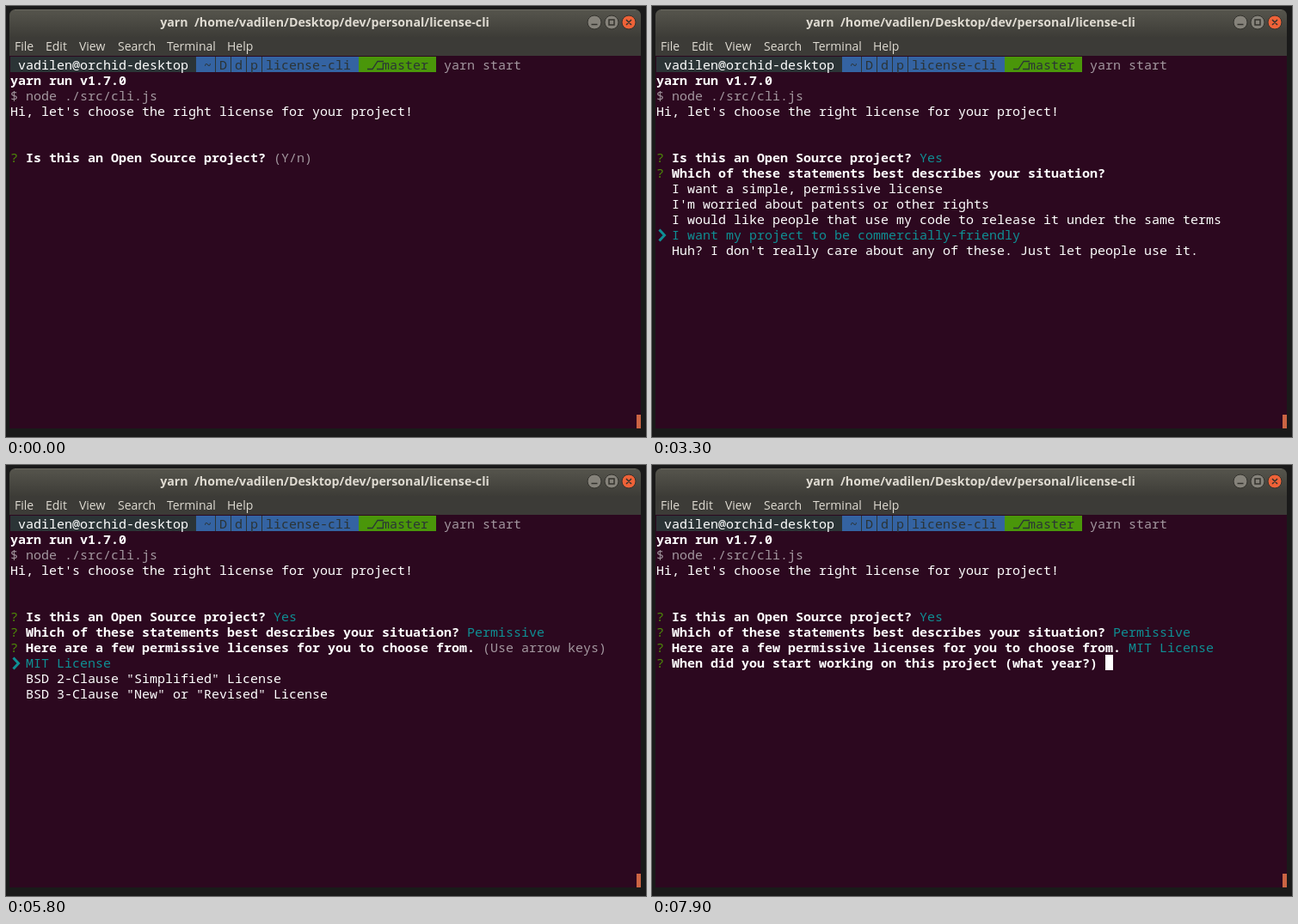
Write an HTML page that moves like this. It is 744 px wide and 502 px high and loops after 8000 ms.

```html
<!DOCTYPE html>
<html lang="en">
<head>
<meta charset="utf-8">
<title>Terminal</title>
<style>
  html, body { margin: 0; width: 100%; height: 100%; overflow: hidden; background: #1a1a1a; }
  svg { display: block; width: 744px; height: 502px; }
  text { white-space: pre; }
  .ui { font: 14px "Open Sans", "Noto Sans", sans-serif; fill: #dfdbd2; }
  .title { font-size: 14.2px; font-weight: 700; }
  .term { font: 15px "Noto Sans Mono", "DejaVu Sans Mono", monospace; }
  .w { fill: #fff; }
  .b { fill: #fff; font-weight: 700; }
  .g { fill: #a3979f; }
  .q { fill: #4e8a08; }
  .c { fill: #0f8f94; }
  .d { fill: #2b3436; }
</style>
</head>
<body>
<svg viewBox="0 0 744 502">
  <defs>
    <linearGradient id="bar" x2="0" y2="1">
      <stop offset="0" stop-color="#56554d"/>
      <stop offset="1" stop-color="#3d3c37"/>
    </linearGradient>
  </defs>
  <rect width="744" height="502" fill="#1a1a1a"/>
  <path d="M4 58V11a7 7 0 0 1 7-7H731a7 7 0 0 1 7 7V58z" fill="#3c3b37"/>
  <path d="M4 36V11a7 7 0 0 1 7-7H731a7 7 0 0 1 7 7V36z" fill="url(#bar)"/>
  <path d="M10 4.5H732" stroke="#6a6960"/>
  <rect x="4" y="58" width="734" height="434" fill="#2c081f"/>
  <rect x="733" y="476" width="5" height="16" fill="#cb6443"/>

  <g class="ui">
    <text class="title" x="370.5" y="24" text-anchor="middle">yarn  /home/vadilen/Desktop/dev/personal/license-cli</text>
    <g id="menu"></g>
  </g>

  <g stroke="#33322d">
    <circle cx="684" cy="19" r="8" fill="#85827a"/>
    <circle cx="704" cy="19" r="8" fill="#85827a"/>
    <circle cx="724" cy="19" r="8" fill="#ee6238"/>
    <path d="M680.5 21.5h7M701 16h6v6h-6zM721 16l6 6m0-6l-6 6" fill="none" stroke-width="1.5"/>
  </g>

  <rect x="5" y="59" width="216" height="18" fill="#2b3436"/>
  <rect x="221" y="59" width="189" height="18" fill="#3463a2"/>
  <rect x="410" y="59" width="90" height="18" fill="#4a960a"/>
  <path d="M243.5 59v18m18-18v18m18-18v18m18-18v18" stroke="#2b3436"/>
  <path d="M420 73.5h6l6-9h7M431 73.5h8" fill="none" stroke="#2b3436" stroke-width="1.3"/>

  <g class="term">
    <g id="head"></g>
    <g id="body"></g>
  </g>
  <path id="arrow" d="M8.5 6.5l6 6.5l-6 6.5" transform="translate(0 200)" fill="none" stroke="#0f8f94" stroke-width="3"/>
  <rect id="cursor" width="9" height="18" fill="#fff"/>
</svg>

<script>
const LOOP = 8000;
const $ = id => document.getElementById(id);
const colX = c => 5 + 9 * c;
const rowY = r => 59 + 18 * r;

const put = (row, col, cls, str) =>
  `<text class="${cls}" x="${colX(col)}" y="${rowY(row) + 15}">${str}</text>`;

// A question line: mark, bold question, then hint or answer
const ask = (row, question, cls = "g", tail = "") =>
  put(row, 0, "q", "?") + put(row, 2, "b", question) +
  put(row, question.length + 3, cls, tail);

const list = (row, items, picked) =>
  items.map((s, i) => put(row + i, 2, i === picked ? "c" : "w", s)).join("");

const OPEN = "Is this an Open Source project?";
const WHICH = "Which of these statements best describes your situation?";
const FEW = "Here are a few permissive licenses for you to choose from.";
const WHEN = "When did you start working on this project (what year?)";
const HINT = "(Use arrow keys)";
const NEEDS = [
  "I want a simple, permissive license",
  "I'm worried about patents or other rights",
  "I would like people that use my code to release it under the same terms",
  "I want my project to be commercially-friendly",
  "Huh? I don't really care about any of these. Just let people use it."
];
const LICENSES = [
  "MIT License",
  'BSD 2-Clause "Simplified" License',
  'BSD 3-Clause "New" or "Revised" License'
];

// [time, selected item]
const MOVES = [[0, 0], [2100, 1], [2800, 2], [3300, 3], [4250, 4],
               [4600, 3], [4650, 2], [4900, 1], [5100, 0]];
const ANSWER = 900, PICK = 5800, YEAR = 6700;

function screen(t) {
  if (t < ANSWER) {
    return { html: ask(6, OPEN, "g", "(Y/n)"), cursor: t >= 100 && t < 800 && [6, 40] };
  }
  let html = ask(6, OPEN, "c", "Yes");
  if (t < PICK) {
    const picked = MOVES.filter(m => m[0] <= t).pop()[1];
    html += ask(7, WHICH, "g", t < MOVES[1][0] ? HINT : "") + list(8, NEEDS, picked);
    return { html, arrow: 8 + picked };
  }
  html += ask(7, WHICH, "c", "Permissive");
  if (t < YEAR) {
    html += ask(8, FEW, "g", HINT) + list(9, LICENSES, 0);
    return { html, arrow: 9 };
  }
  html += ask(8, FEW, "c", LICENSES[0]) + ask(9, WHEN);
  return { html, cursor: Math.floor((t - YEAR) / 600) % 2 === 0 && [9, 58] };
}

$("menu").innerHTML = [["File", 10], ["Edit", 46], ["View", 85], ["Search", 130], ["Terminal", 187], ["Help", 257]]
  .map(([s, x]) => `<text x="${x}" y="52">${s}</text>`).join("");

$("head").innerHTML =
  put(0, 1, "w", "vadilen@orchid-desktop") +
  put(0, 25, "d", "~ D d p license-cli") +
  put(0, 48, "d", "master") +
  put(0, 56, "g", "yarn start") +
  put(1, 0, "b", "yarn run v1.7.0") +
  put(2, 0, "g", "$ node ./src/cli.js") +
  put(3, 0, "w", "Hi, let's choose the right license for your project!");

let shown = "";
function draw(t) {
  const { html, arrow, cursor } = screen(t);
  if (html !== shown) $("body").innerHTML = shown = html;
  $("arrow").style.display = arrow ? "" : "none";
  if (arrow) $("arrow").setAttribute("transform", `translate(0 ${rowY(arrow) - 3})`);
  $("cursor").style.display = cursor ? "" : "none";
  if (cursor) {
    $("cursor").setAttribute("x", colX(cursor[1]));
    $("cursor").setAttribute("y", rowY(cursor[0]));
  }
}

const start = performance.now();
function tick() {
  draw((performance.now() - start) % LOOP);
  requestAnimationFrame(tick);
}
tick();
</script>
</body>
</html>
```
